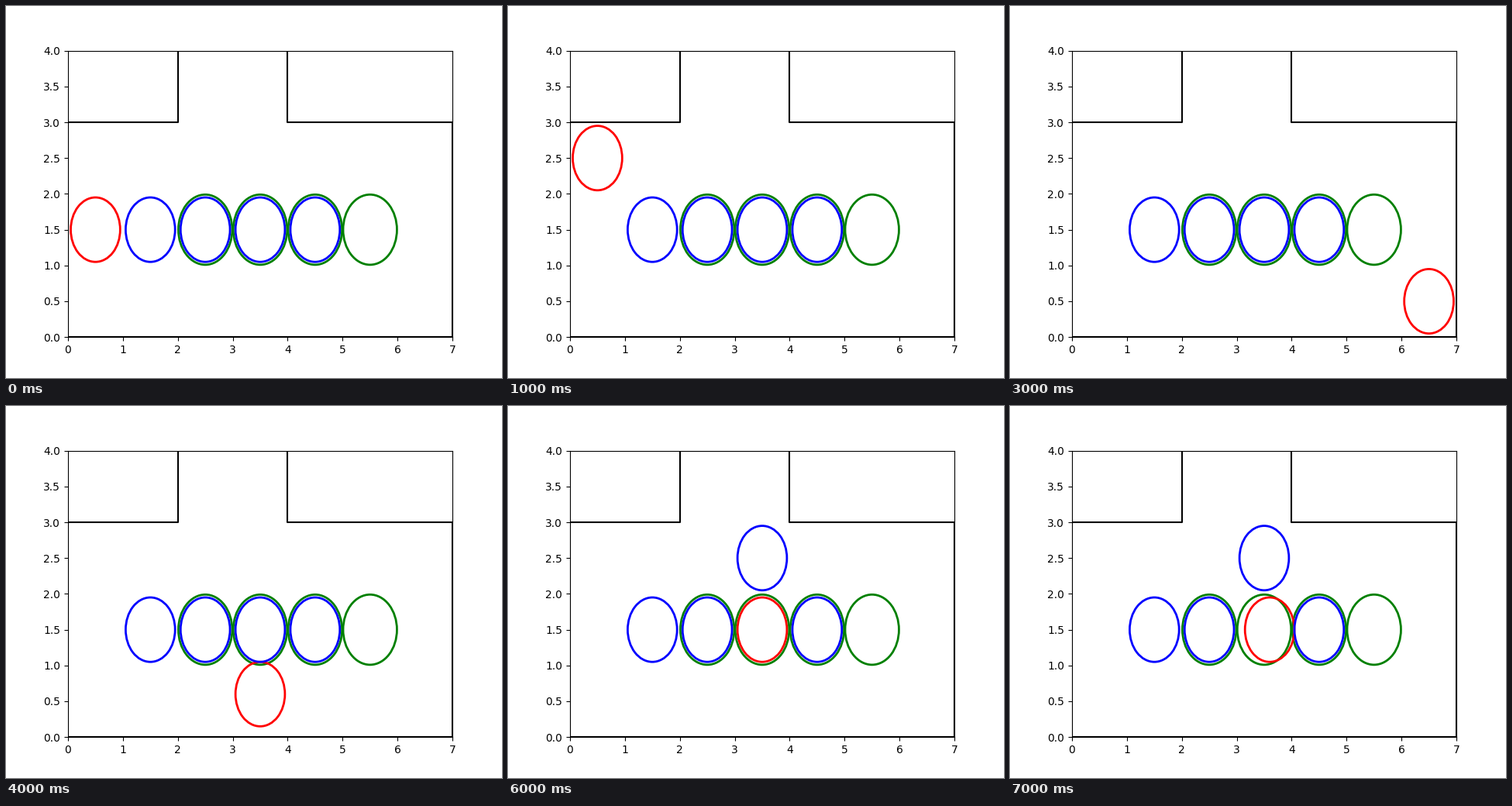
Recreate the animation shown at these times as a matplotlib script. Size 640 by 480 pixels, loop 8000 ms.

```python
import numpy as np
import matplotlib.pyplot as plt
from matplotlib.animation import FuncAnimation

WIDTH, HEIGHT = 7, 4
DOOR_LEFT, DOOR_RIGHT, CEILING = 2, 4, 3
BODY = 0.45       # radius of robot and boxes
GOAL = 0.49
PUSH_STEP = 5     # step at which the box has moved up one cell
UP, RIGHT = np.array([0, 1]), np.array([1, 0])


def cell(col, row):
    return np.array([col + 0.5, row + 0.5])


def contact(box, direction):
    """Where the robot touches a box that it will push."""
    return box - 2 * BODY * direction


def ring(center, radius, color):
    patch = plt.Circle(center, radius, fill=False, edgecolor=color, lw=2, zorder=2)
    return ax.add_patch(patch)


def draw_walls():
    corners = [(0, CEILING), (DOOR_LEFT, CEILING), (DOOR_LEFT, HEIGHT),
               (DOOR_RIGHT, HEIGHT), (DOOR_RIGHT, CEILING), (WIDTH, CEILING),
               (WIDTH, 0), (0, 0), (0, CEILING)]
    ax.plot(*zip(*corners), color="black", lw=1.5)


def robot_route():
    """Walk round the boxes, push one up, then line up with the next."""
    around = [cell(0, 1), cell(0, 2), cell(WIDTH - 1, 2), cell(WIDTH - 1, 0)]
    below = contact(cell(3, 1), UP)
    return around + [below, below + UP, cell(3, 1), contact(cell(4, 1), RIGHT)]


fig, ax = plt.subplots(figsize=(6.4, 4.8), dpi=100)
ax.set_xlim(0, WIDTH)
ax.set_ylim(0, HEIGHT)

draw_walls()
for col in range(2, 6):
    ring(cell(col, 1), GOAL, "green")
route = robot_route()
robot = ring(route[0], BODY, "red")
boxes = {col: ring(cell(col, 1), BODY, "blue") for col in range(1, 5)}


def update(step):
    robot.center = route[step]
    boxes[3].center = cell(3, 2 if step >= PUSH_STEP else 1)
    return [robot, boxes[3]]


anim = FuncAnimation(fig, update, frames=len(route), interval=1000, repeat=True)
plt.show()
```
